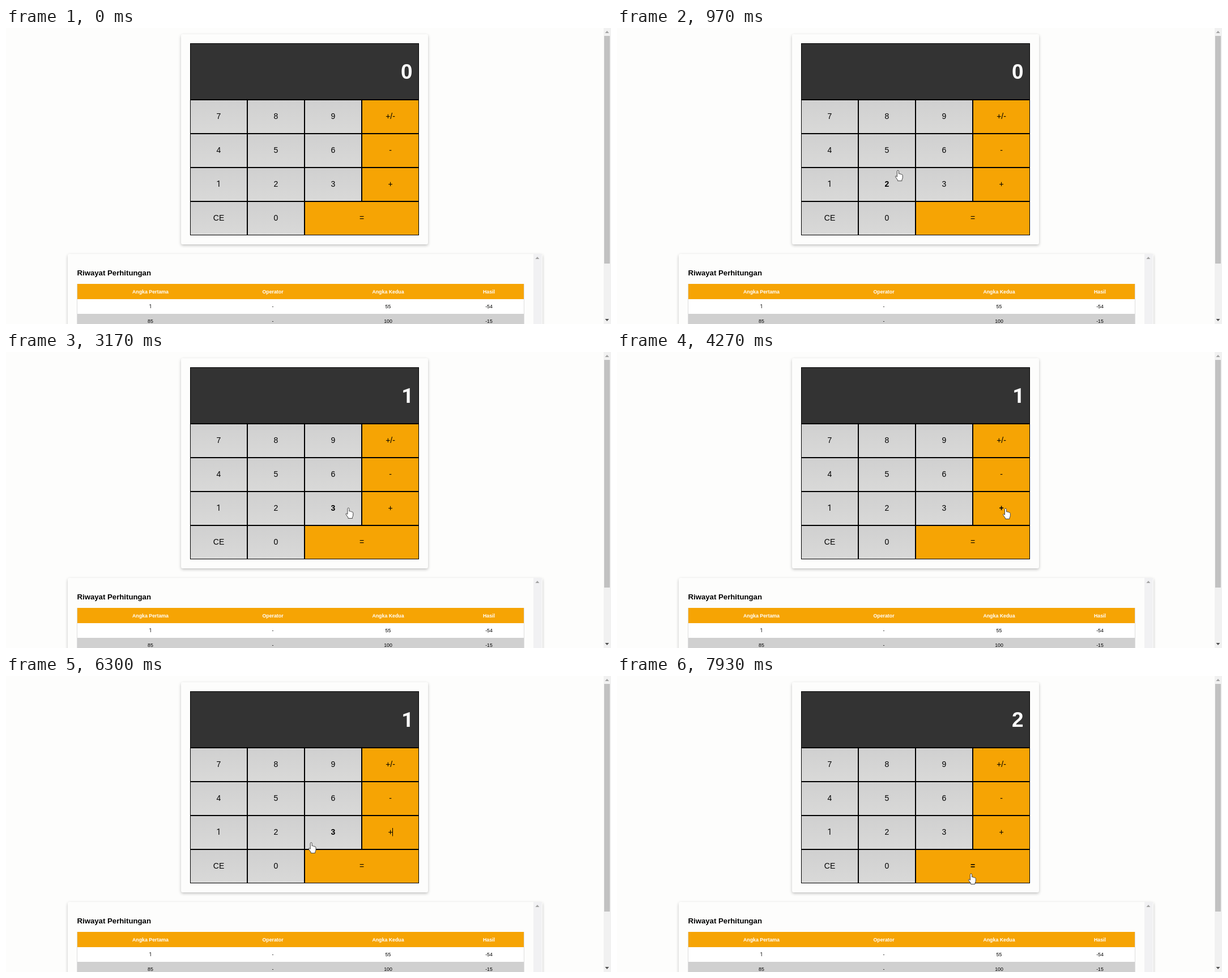
Recreate the animation shown at these times as an HTML page. Size 1068x524 px, loop 8 s.

```html
<!DOCTYPE html>
<html lang="id">
<head>
<meta charset="utf-8">
<title>Kalkulator</title>
<style>
  html, body { margin: 0; width: 100%; height: 100%; overflow: hidden; background: #fdfdfc; }
  svg { display: block; width: 1068px; height: 524px; font-family: "Liberation Sans", Arial, sans-serif; cursor: default; }
  .card { fill: #fdfdfc; filter: drop-shadow(0 2px 2.5px rgba(0, 0, 0, .24)); }
  .key { stroke: #000; }
  .label { font-size: 14px; text-anchor: middle; }
  .hover { font-weight: bold; }
  .display { font-size: 37px; font-weight: bold; fill: #fff; text-anchor: end; }
  .title { font-size: 13.2px; font-weight: bold; }
  .cell { font-size: 8.8px; text-anchor: middle; }
  .head { font-weight: bold; fill: #fff; }
  .one { font-family: Roboto, sans-serif; }
</style>
</head>
<body>
<svg viewBox="0 0 1068 524">
  <linearGradient id="grey" x2="0" y2="1">
    <stop stop-color="#d0d0d0"/>
    <stop offset="1" stop-color="#d9d9d8"/>
  </linearGradient>

  <rect class="card" x="309" y="11" width="436" height="372" rx="3"/>
  <rect class="key" x="325.5" y="27.5" width="403" height="99" fill="#333"/>
  <text class="display" id="display" x="717.5" y="90">0</text>
  <g id="keys"></g>

  <rect class="card" x="109" y="400" width="838" height="140" rx="3"/>
  <rect x="931" y="400" width="15" height="124" fill="#f1f1f3"/>
  <path d="M934.5 409l3.5-4 3.5 4z" fill="#a3a3a3"/>
  <text class="title" x="125.5" y="438">Riwayat Perhitungan</text>
  <rect x="125.5" y="453.5" width="789" height="90" fill="none" stroke="#ddd"/>
  <g id="table"></g>

  <rect x="1055" width="13" height="524" fill="#f1f1f1"/>
  <rect x="1056" y="14" width="10" height="403" fill="#c1c1c1"/>
  <path d="M1057.5 9l3.5-4 3.5 4z" fill="#a3a3a3"/>
  <path d="M1057.5 515l3.5 4 3.5-4z" fill="#505050"/>

  <rect id="caret" y="269" width="1" height="14.5"/>
  <g id="pointer" fill="#fff" stroke="#444" stroke-linejoin="round">
    <path id="hand" d="M-1.5 1.5Q-1.5 0 0 0T1.5 1.5V6Q3 5 4 6.5Q5.5 5.8 6.2 7.2Q8 6.8 8.3 8.6V13Q8 15 7 16.5V18.5H-.5V17L-4.2 11.8Q-5 9.6-3.2 9.8L-1.5 11.3Z"/>
    <path id="arrow" d="M0 0V14L3.2 11L5.5 16L7.5 15L5.3 10.3H9.8Z"/>
  </g>
</svg>
<script>
const LOOP = 8000, BLINK = 530, PRESS = 65;
const KEY_W = 101, KEY_H = 60;
const $ = id => document.getElementById(id);

function add(parent, tag, attrs, text) {
  const el = document.createElementNS('http://www.w3.org/2000/svg', tag);
  for (const name in attrs) el.setAttribute(name, attrs[name]);
  if (text) setText(el, text);
  parent.append(el);
  return el;
}

// A lone 1 is drawn without a foot
function setText(el, text) {
  el.textContent = text;
  el.classList.toggle('one', text === '1');
}

function show(el, on) {
  el.style.display = on ? '' : 'none';
}

// Calculator keys on a four-column grid
const keys = {};
['7 8 9 +/-', '4 5 6 -', '1 2 3 +', 'CE 0 ='].forEach((row, r) =>
  row.split(' ').forEach((name, c) => {
    const x = 325 + c * KEY_W, y = 127 + r * KEY_H;
    const w = name === '=' ? 2 * KEY_W : KEY_W;
    const fill = /\d|CE/.test(name) ? 'url(#grey)' : '#f6a404';
    add($('keys'), 'rect', { class: 'key', x: x + .5, y: y + .5, width: w - 1, height: KEY_H - 1, fill });
    const label = add($('keys'), 'text', { class: 'label', x: x + w / 2, y: y + 34 }, name);
    keys[name] = { x, y, w, label };
  }));

// History table
const columns = [255, 471, 674.5, 852.5], fills = ['#f6a404', '#fff', '#d0d0d0'];
['Angka Pertama|Operator|Angka Kedua|Hasil', '1|-|55|-54', '85|-|100|-15'].forEach((row, r) => {
  const y = Math.round(453 + r * 26.5);
  add($('table'), 'rect', { x: 126, y, width: 788, height: 27, fill: fills[r] });
  row.split('|').forEach((text, c) =>
    add($('table'), 'text', { class: r ? 'cell' : 'cell head', x: columns[c], y: 470 + r * 26 }, text));
});

// Pointer moves: start, end, tip position reached
const ENTRY = [1050, 130];
const moves = [
  [530, 970, 496, 252],
  [970, 1130, 489, 263],
  [1400, 1800, 357, 273],
  [2940, 3400, 686, 277],
  [5040, 5530, 671, 289],
  [5670, 6300, 539, 295],
  [6300, 6900, 449, 273],
  [7440, 7930, 625, 350]
];

// Clicks: time, key, side of the label the caret lands on, value shown
const clicks = [
  { at: 2630, key: '1', side: -1, value: '1' },
  { at: 3730, key: '+', side: 1, value: '1' },
  { at: 7170, key: '2', side: -1, value: '2' }
];

const easeOut = k => 1 - (1 - k) ** 2;

function tipAt(t) {
  let [x, y] = ENTRY;
  for (const [from, to, x1, y1] of moves) {
    const k = easeOut(Math.min(1, Math.max(0, (t - from) / (to - from))));
    x += (x1 - x) * k;
    y += (y1 - y) * k;
  }
  return [x, y];
}

function drawPointer(t) {
  const visible = t >= moves[0][0];
  const [x, y] = tipAt(t);
  let over = false;
  for (const key of Object.values(keys)) {
    const hit = visible && x >= key.x && x < key.x + key.w && y >= key.y && y < key.y + KEY_H;
    key.label.classList.toggle('hover', hit);
    over = over || hit;
  }
  show($('pointer'), visible);
  show($('hand'), over);
  show($('arrow'), !over);
  $('pointer').setAttribute('transform', `translate(${x} ${y})`);
}

function drawClicks(t) {
  const last = clicks.filter(c => c.at <= t).pop();
  const done = clicks.filter(c => c.at + PRESS <= t).pop();
  show($('caret'), last && Math.floor((t - last.at) / BLINK) % 2 === 0);
  if (last) {
    const { x, w } = keys[last.key];
    $('caret').setAttribute('x', Math.floor(x + w / 2 + last.side * 4));
  }
  const value = done ? done.value : '0';
  setText($('display'), value);
  $('display').setAttribute('x', value === '1' ? 719.5 : 717.5);
}

const start = performance.now();
function tick() {
  const t = (performance.now() - start) % LOOP;
  drawPointer(t);
  drawClicks(t);
  requestAnimationFrame(tick);
}
tick();
</script>
</body>
</html>
```
